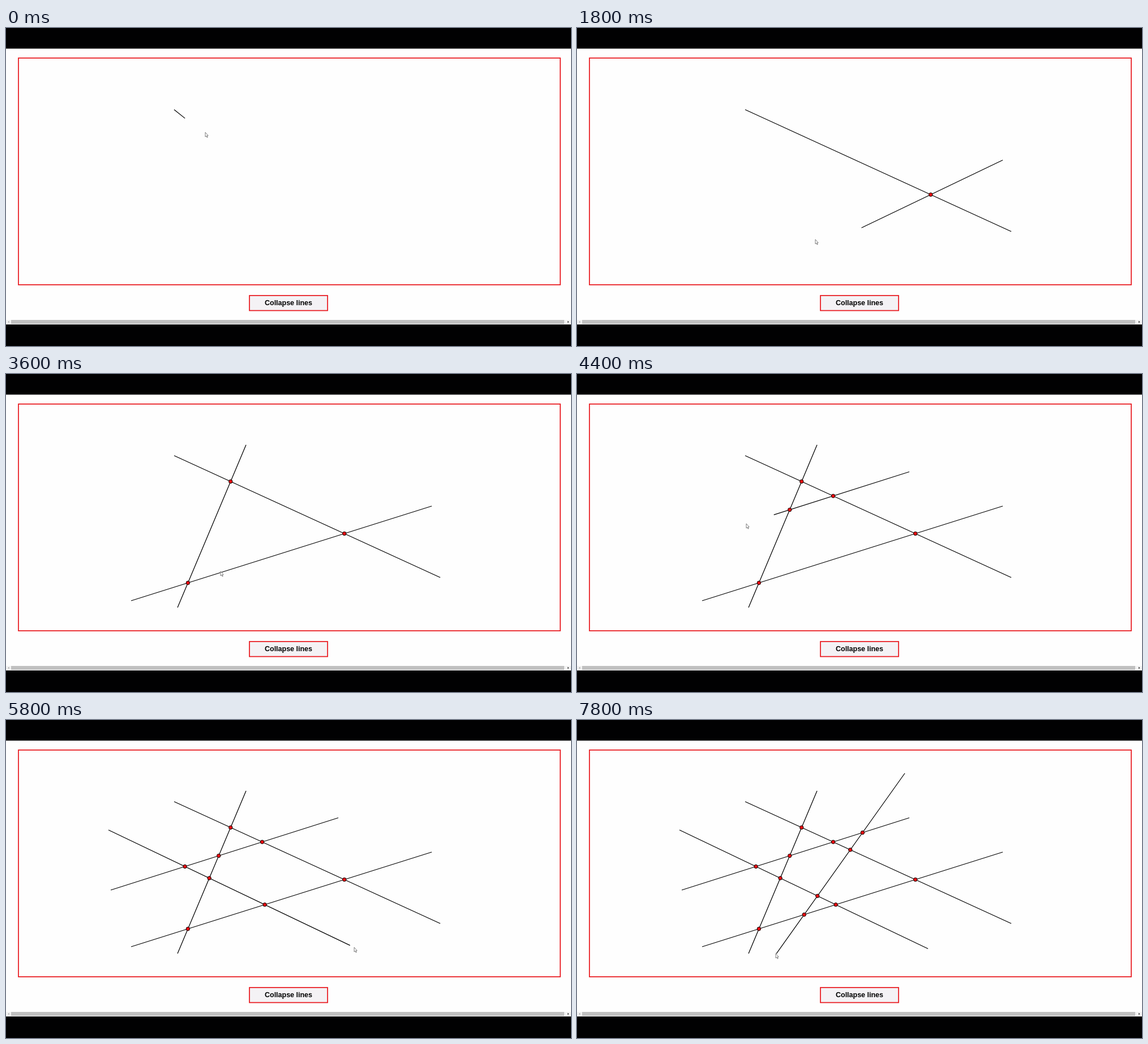
Recreate the animation shown at these times as an HTML page with a canvas. Size 998x561 px, loop 8000 ms.

```html
<!DOCTYPE html>
<html lang="en">
<head>
<meta charset="utf-8">
<title>Collapse lines</title>
<style>
  html, body { margin: 0; width: 100%; height: 100%; overflow: hidden; background: #010102; }
  svg, canvas { position: absolute; left: 0; top: 0; }
  text { font: bold 12.5px "Liberation Sans", Arial, sans-serif; text-anchor: middle; }
  .box { stroke: #e8141a; stroke-width: 1.7; }
</style>
</head>
<body>
<svg width="998" height="561">
  <rect y="36.4" width="998" height="486.6" fill="#fefefe"/>
  <rect class="box" x="22" y="53" width="957" height="400" fill="none"/>
  <rect class="box" x="430" y="472" width="138" height="26.5" fill="#f4f2f5"/>
  <text x="499" y="489.3">Collapse lines</text>
  <rect y="515" width="998" height="7" fill="#f3f3f3"/>
  <rect x="9" y="515" width="977" height="7" fill="#c1c1c1"/>
  <path d="M5.5 516.5V520.5L3.5 518.5Z" fill="#a0a0a0"/>
  <path d="M992 516.5V520.5L994.5 518.5Z" fill="#404040"/>
</svg>
<canvas width="998" height="561"></canvas>
<script>
const LOOP = 8000, STEP = 200, LAG = 60;
const ctx = document.querySelector('canvas').getContext('2d');

// Each drag draws one line; "via" bends the hand's route from end to end.
const drags = [
  { press: -95, release: 1305, from: [297, 144], via: [420, 249], to: [767, 359] },
  { press: 1590, release: 2250, from: [752, 233], via: [560, 376], to: [221, 400] },
  { press: 2840, release: 3540, from: [424, 125], to: [303, 412] },
  { press: 4150, release: 4880, from: [587, 172.5], to: [185, 300] },
  { press: 5190, release: 5980, from: [181, 194], to: [620, 403.5] },
  { press: 6580, release: 7920, from: [579, 94], via: [604, 440], to: [351, 412] }
];

const middle = (a, b) => a.map((v, i) => (v + b[i]) / 2);

function glide(from, to, start, end, t, via = middle(from, to)) {
  const s = Math.min(1, Math.max(0, (t - start) / (end - start)));
  const u = 1 - (1 - s) ** 3, w = 1 - u;
  return from.map((v, i) => w * w * v + 2 * w * u * via[i] + u * u * to[i]);
}

const dragPoint = (d, t) => glide(d.from, d.to, d.press, d.release, t, d.via);

function pointer(t) {
  const i = drags.findLastIndex(d => d.press <= t);
  const drag = drags[i], next = drags[i + 1];
  return t > drag.release && next
    ? glide(drag.to, next.from, drag.release, next.press, t)
    : dragPoint(drag, t);
}

function crossing([[ax, ay], [bx, by]], [[cx, cy], [dx, dy]]) {
  const rx = bx - ax, ry = by - ay, sx = dx - cx, sy = dy - cy;
  const det = rx * sy - ry * sx;
  if (!det) return null;
  const u = ((cx - ax) * sy - (cy - ay) * sx) / det;
  const v = ((cx - ax) * ry - (cy - ay) * rx) / det;
  return u >= 0 && u <= 1 && v >= 0 && v <= 1 ? [ax + u * rx, ay + u * ry] : null;
}

function drawLine([a, b]) {
  ctx.beginPath();
  ctx.moveTo(...a);
  ctx.lineTo(...b);
  ctx.strokeStyle = '#000';
  ctx.lineWidth = 1.25;
  ctx.stroke();
}

function drawDot([x, y]) {
  ctx.beginPath();
  ctx.arc(x, y, 3.2, 0, Math.PI * 2);
  ctx.fillStyle = '#f00a10';
  ctx.strokeStyle = '#000';
  ctx.lineWidth = 1;
  ctx.fill();
  ctx.stroke();
}

const arrow = new Path2D('M0 0V8L1.8 6.4L3 9.2L4.2 8.7L3 5.9H5.2Z');
function drawPointer([x, y]) {
  ctx.save();
  ctx.translate(Math.round(x), Math.round(y));
  ctx.fillStyle = '#fff';
  ctx.strokeStyle = '#606060';
  ctx.lineWidth = .8;
  ctx.fill(arrow);
  ctx.stroke(arrow);
  ctx.restore();
}

function draw(t) {
  const lines = drags.filter(d => d.press < t).map(d => [d.from, dragPoint(d, t - LAG)]);
  ctx.clearRect(0, 0, 998, 561);
  lines.forEach(drawLine);
  lines.forEach((line, i) => lines.slice(0, i).forEach(other => {
    const point = crossing(line, other);
    if (point) drawDot(point);
  }));
  drawPointer(pointer(t));
}

const start = performance.now();
function tick() {
  const t = (performance.now() - start) % LOOP;
  draw(Math.floor(t / STEP) * STEP);
  requestAnimationFrame(tick);
}
tick();
</script>
</body>
</html>
```
